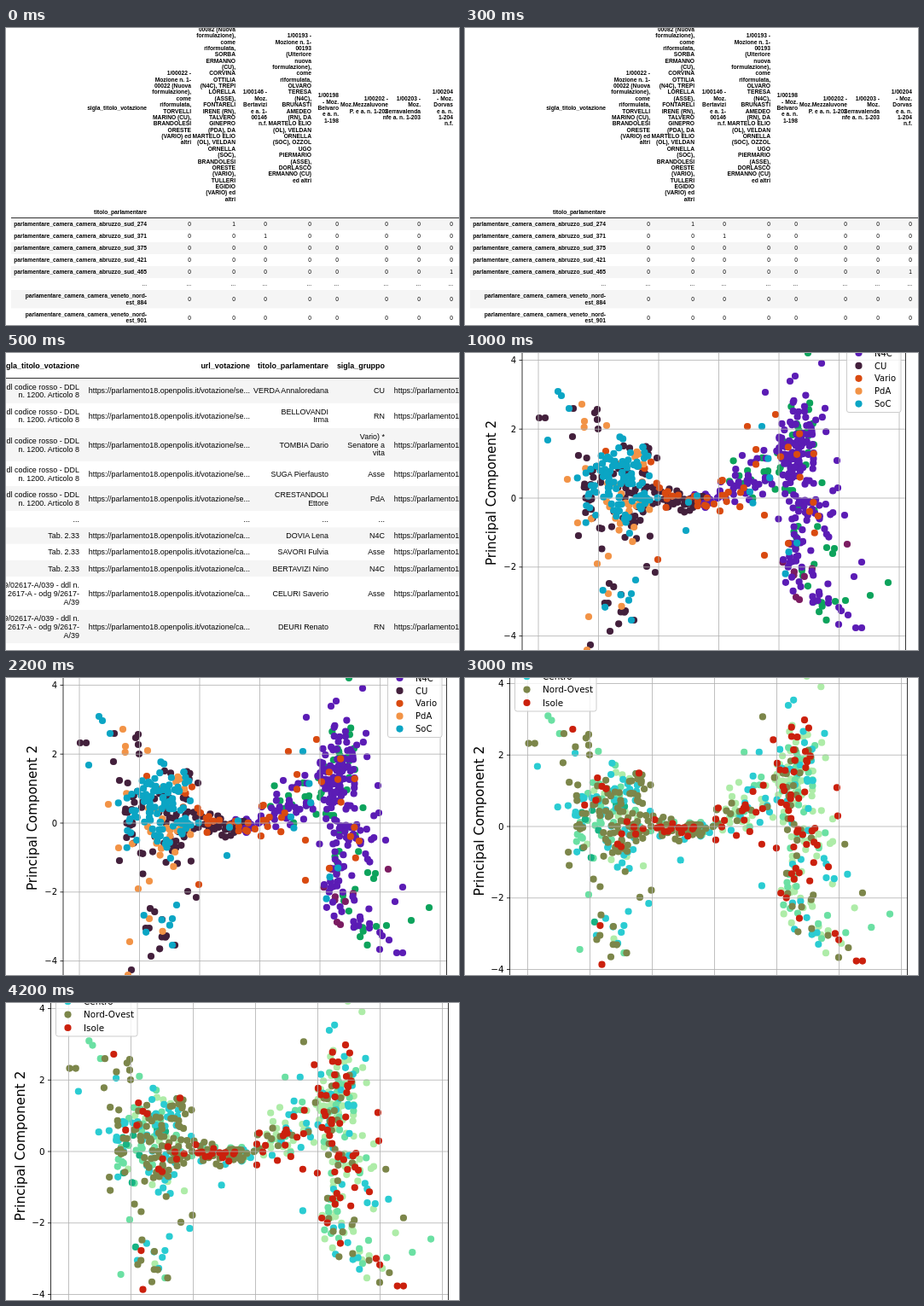
Recreate the animation shown at these times as an HTML page. Size 531 by 348 pixels, loop 5000 ms.

```html
<!DOCTYPE html>
<html lang="it">
<head>
<meta charset="utf-8">
<style>
  html, body { margin: 0; width: 100%; height: 100%; overflow: hidden; background: #fff; }
  svg { display: block; width: 531px; height: 348px; }
  .table { font-family: "Liberation Sans", Arial, sans-serif; }
  .plot { font-family: "DejaVu Sans", sans-serif; }
</style>
</head>
<body>
<svg viewBox="0 0 531 348"></svg>
<script>
const svg = document.querySelector('svg');

function add(parent, tag, attrs, content = '') {
  const el = document.createElementNS('http://www.w3.org/2000/svg', tag);
  for (const key in attrs) el.setAttribute(key, attrs[key]);
  el.textContent = content;
  return parent.appendChild(el);
}
const scene = cls => add(svg, 'g', { class: cls, visibility: 'hidden' });
const line = (g, x1, y1, x2, y2, stroke, width = 0.8) =>
  add(g, 'line', { x1, y1, x2, y2, stroke, 'stroke-width': width });
const rect = (g, x, y, width, height, fill) => add(g, 'rect', { x, y, width, height, fill });

// Lines separated by "|" are centred vertically on y.
function label(g, x, y, text, size, lead, weight = 400, anchor = 'end') {
  const lines = text.split('|');
  lines.forEach((s, i) => add(g, 'text', {
    x, y: y + (i - (lines.length - 1) / 2) * lead + size * 0.36,
    'font-size': size, 'font-weight': weight, 'text-anchor': anchor
  }, s));
}

function voteMatrix() {
  const g = scene('table'), size = 6.7, lead = 7.37;
  const right = [217, 269, 306, 358, 390, 448, 486, 524];
  const heads = [
    '1/00022 -|Mozione n. 1-|00022 (Nuova|formulazione),|come|riformulata,|TORVELLI|MARINO (CU),|BRANDOLESI|ORESTE|(VARIO) ed|altri',
    '1/00082 -|Mozione n. 1-|00082 (Nuova|formulazione),|come|riformulata,|SORBA|ERMANNO|(CU),|CORVINA|OTTILIA|(N4C), TREPI|LORELLA|(ASSE),|FONTARELI|IRENE (RN),|TALVERO|GINEPRO|(PDA), DA|MARTELO ELIO|(OL), VELDAN|ORNELLA|(SOC),|BRANDOLESI|ORESTE|(VARIO),|TULLERI|EGIDIO|(VARIO) ed|altri',
    '1/00146 -|Moz.|Bertavizi|e a. 1-|00146|n.f.',
    '1/00193 -|Mozione n. 1-|00193|(Ulteriore|nuova|formulazione),|come|riformulata,|OLVARO|TERESA|(N4C),|BRUNASTI|AMEDEO|(RN), DA|MARTELO ELIO|(OL), VELDAN|ORNELLA|(SOC), OZZOL|UGO|PIERMARIO|(ASSE),|DORLASCO|ERMANNO (CU)|ed altri',
    '1/00198|- Moz.|Belvaro|e a. n.|1-198',
    '1/00202 -|Moz.Mezzaluvone|P. e a. n. 1-202|nf',
    '1/00203 -|Moz.|Serravalenda|e a. n. 1-203',
    '1/00204|- Moz.|Dorvas|e a. n.|1-204|n.f.'
  ];
  const seat = 'parlamentare_camera_camera_';
  const rows = [
    ...[274, 371, 375, 421, 465].map(n => seat + 'abruzzo_sud_' + n), '...',
    ...[884, 901].map(n => seat + 'veneto_nord-|est_' + n)
  ];
  const ones = { 0: 1, 1: 2, 4: 7 };

  label(g, 165, 93.5, 'sigla_titolo_votazione', size, lead, 700);
  label(g, 165, 215.5, 'titolo_parlamentare', size, lead, 700);
  heads.forEach((h, i) => label(g, right[i], 93.5, h, size, lead, 700));
  let y = 223;
  rows.forEach((name, r) => {
    const h = name.includes('|') ? 21.4 : 14, mid = y + h / 2;
    if (r % 2 == 0) rect(g, 6, y, 525, h, '#f5f5f5');
    label(g, 165, mid, name, size, lead, name == '...' ? 400 : 700);
    right.forEach((x, c) => label(g, x, mid, name == '...' ? name : ones[r] === c ? '1' : '0', size, lead));
    y += h;
  });
  line(g, 6, 222.5, 531, 222.5, '#333', 1);
  return g;
}

function voteList() {
  const g = scene('table'), size = 8.95, lead = 9.85;
  const right = [86, 286, 378, 444, 644];
  const url = 'https://parlamento18.openpolis.it/votazione/';
  const red = 'ddl codice rosso - DDL|n. 1200. Articolo 8';
  const odg = '9/02617-A/039 - ddl n.|2617-A - odg 9/2617-|A/39';
  const rows = [
    [red, 'se', 'VERDA Annaloredana', 'CU'],
    [red, 'se', 'BELLOVANDI|Irma', 'RN'],
    [red, 'se', 'TOMBIA Dario', 'Vario) *|Senatore a|vita'],
    [red, 'se', 'SUGA Pierfausto', 'Asse'],
    [red, 'se', 'CRESTANDOLI|Ettore', 'PdA'],
    null,
    ['Tab. 2.33', 'ca', 'DOVIA Lena', 'N4C'],
    ['Tab. 2.33', 'ca', 'SAVORI Fulvia', 'Asse'],
    ['Tab. 2.33', 'ca', 'BERTAVIZI Nino', 'N4C'],
    [odg, 'ca', 'CELURI Saverio', 'Asse'],
    [odg, 'ca', 'DEURI Renato', 'RN']
  ];
  ['sigla_titolo_votazione', 'url_votazione', 'titolo_parlamentare', 'sigla_gruppo']
    .forEach((h, i) => label(g, right[i], 15, h, size, lead, 700));
  let y = 29.7;
  rows.forEach((row, r) => {
    const link = row && url + row[1] + '...';
    const cells = row ? [row[0], link, row[2], row[3], link] : right.map(() => '...');
    const h = 9.4 + lead * Math.max(...cells.map(c => c.split('|').length));
    if (r % 2 == 0) rect(g, 0, y, 531, h, '#f5f5f5');
    cells.forEach((c, i) => label(g, right[i], y + h / 2, c, size, lead));
    y += h;
  });
  line(g, 0, 29.5, 531, 29.5, '#333', 1);
  return g;
}

// Parties: green, maroon, purple, dark, red, orange, blue (in drawing order).
const partyColors = { g: '#0da35c', m: '#7b1c62', p: '#5b1cb5', d: '#43203c', r: '#d94a10', o: '#f29346', b: '#0ba5c4' };
// Regions: light, mint, teal, cyan, olive, red.
const areaColors = { l: '#aeeca8', m: '#6be0a3', t: '#18b384', c: '#2accd2', o: '#7c864a', r: '#cb200d' };

let seed = 11;
const rand = () => (seed = (seed * 16807) % 2147483647) / 2147483647;
const bell = () => rand() + rand() + rand() - 1.5;
const pick = s => s[Math.floor(rand() * s.length)];
const points = [];

// Count, centre, spread, slope, then weighted party and area keys.
function cloud(n, cx, cy, sx, sy, slope, parties, areas) {
  while (n--) {
    const dx = bell() * sx;
    points.push({ x: cx + dx, y: cy + bell() * sy + dx * slope, party: pick(parties), area: pick(areas) });
  }
}
function marks(party, areas, ...xy) {
  for (let i = 0; i < xy.length; i += 2)
    points.push({ x: xy[i], y: xy[i + 1], party, area: areas[i / 2] });
}

const west = 'oooooommmccclrt', east = 'lllllllcccmmmooorrr';
cloud(95, 178, 140, 32, 40, 0, 'bbbbbbbddo', west);
cloud(26, 146, 163, 8, 40, 0, 'dddbo', west);
cloud(42, 187, 195, 26, 36, 0, 'bbddddoo', west);
cloud(24, 210, 145, 12, 44, 0, 'bbdddr', west);
cloud(24, 210, 172, 18, 12, 0, 'dddbbo', 'ooooomcr');
cloud(42, 248, 172, 24, 14, 0.15, 'dddddddrrb', 'oooooomcrr');
cloud(30, 281, 172, 18, 9, 0, 'ppppbrd', 'oooooomcr');
cloud(26, 312, 165, 20, 22, -0.3, 'pppppgr', east);
cloud(44, 340, 143, 25, 30, -0.2, 'ppppggrb', east);
cloud(95, 386, 120, 21, 38, 0, 'pppppppppggr', east);
cloud(30, 398, 75, 20, 32, 0, 'pppppppgg', east);
cloud(50, 402, 182, 28, 40, 0, 'pppppppggr', east);
cloud(32, 385, 235, 14, 38, 0, 'pppppgbm', east);
cloud(26, 415, 277, 28, 30, 0.5, 'ppppggm', east);
cloud(12, 175, 297, 20, 26, 0, 'dddbbo', west);

marks('b', 'mmmcccmcc', 109, 45, 113, 50, 122, 65, 97, 102, 200, 266, 195, 282, 195, 313, 259, 208, 348, 86);
marks('d', 'ooooooooooocoooroo', 87, 76, 94, 76, 127, 65, 126, 98, 152, 70, 155, 66, 155, 78, 156, 89, 133, 120,
  133, 214, 213, 250, 223, 257, 183, 283, 169, 270, 198, 313, 170, 326, 147, 342, 225, 123);
marks('o', 'rcomomormo', 137, 60, 120, 148, 140, 80, 166, 85, 132, 199, 155, 247, 168, 238, 168, 282, 145, 309, 143, 348);
marks('r', 'mrcooorr', 331, 86, 364, 72, 351, 237, 226, 242, 379, 223, 300, 150, 351, 190, 165, 115);
marks('p', 'olrroolrroocc', 352, 46, 418, 12, 436, 126, 437, 158, 445, 190, 465, 245, 456, 262, 465, 322, 458, 322,
  449, 307, 438, 318, 381, 33, 387, 27);
marks('g', 'lmmmclc', 402, 0, 496, 269, 475, 284, 446, 290, 424, 228, 431, 235, 433, 229);
marks('m', 'cco', 448, 224, 388, 286, 392, 289);

function scatter({ key, colors, x0, dx, y0, dy, left, edge, titleX, titleY, titleSize, tick, legend }) {
  const g = scene('plot');
  const sx = dx / 70.5, sy = dy / 80.8;
  for (const k in colors)
    for (const p of points)
      if (p[key] == k)
        add(g, 'circle', { cx: x0 + (p.x - 86) * sx, cy: y0 + (p.y - 170) * sy, r: 4.1, fill: colors[k] });
  for (let i = 0; i < 7; i++) line(g, x0 + i * dx, 0, x0 + i * dx, 348, '#b0b0b0');
  for (let i = -2; i <= 2; i++) {
    const y = y0 - i * dy;
    line(g, left, y, edge, y, '#b0b0b0');
    line(g, left - 3.5, y, left, y, '#000');
    label(g, left - 7, y, String(i * 2).replace('-', '\u2212'), tick, 0);
  }
  line(g, left, 0, left, 348, '#000');
  line(g, edge, 0, edge, 348, '#000');
  const title = add(g, 'g', { transform: `translate(${titleX} ${titleY}) rotate(-90)` });
  label(title, 0, 0, 'Principal Component 2', titleSize, 0, 400, 'middle');

  const { x, width, bottom, top, step, items } = legend;
  add(g, 'rect', { x, y: -60, width, height: bottom + 60, rx: 2.5, fill: '#fff', 'fill-opacity': 0.8, stroke: '#ccc' });
  items.forEach(([k, name], i) => {
    const y = top + i * step;
    add(g, 'circle', { cx: x + 14, cy: y, r: 4.1, fill: colors[k] });
    label(g, x + 32.5, y, name, tick, 0, 400, 'start');
  });
  return g;
}

const byParty = {
  key: 'party', colors: partyColors, x0: 86, dx: 70.5, y0: 170, dy: 80.8, left: 67, edge: 516.5,
  titleX: 31, titleY: 164, titleSize: 15, tick: 10,
  legend: { x: 447.5, width: 63.5, bottom: 69.5, top: 0, step: 14.9,
    items: [['p', 'N4C'], ['d', 'CU'], ['r', 'Vario'], ['o', 'PdA'], ['b', 'SoC']] }
};
const byArea = {
  key: 'area', colors: areaColors, x0: 73.5, dx: 73, y0: 174, dy: 83.75, left: 52.5, edge: 518.5,
  titleX: 16.5, titleY: 167.5, titleSize: 15.5, tick: 10.4,
  legend: { x: 58.5, width: 95.5, bottom: 39, top: -1.8, step: 15.4,
    items: [['c', 'Centro'], ['o', 'Nord-Ovest'], ['r', 'Isole']] }
};

const scenes = [voteMatrix(), voteList(), scatter(byParty), scatter(byArea)];
const ends = [500, 1000, 3000, 5000];

function draw() {
  const t = performance.now() % 5000;
  const current = ends.findIndex(end => t < end);
  scenes.forEach((g, i) => g.setAttribute('visibility', i == current ? 'visible' : 'hidden'));
  requestAnimationFrame(draw);
}
draw();
</script>
</body>
</html>
```
